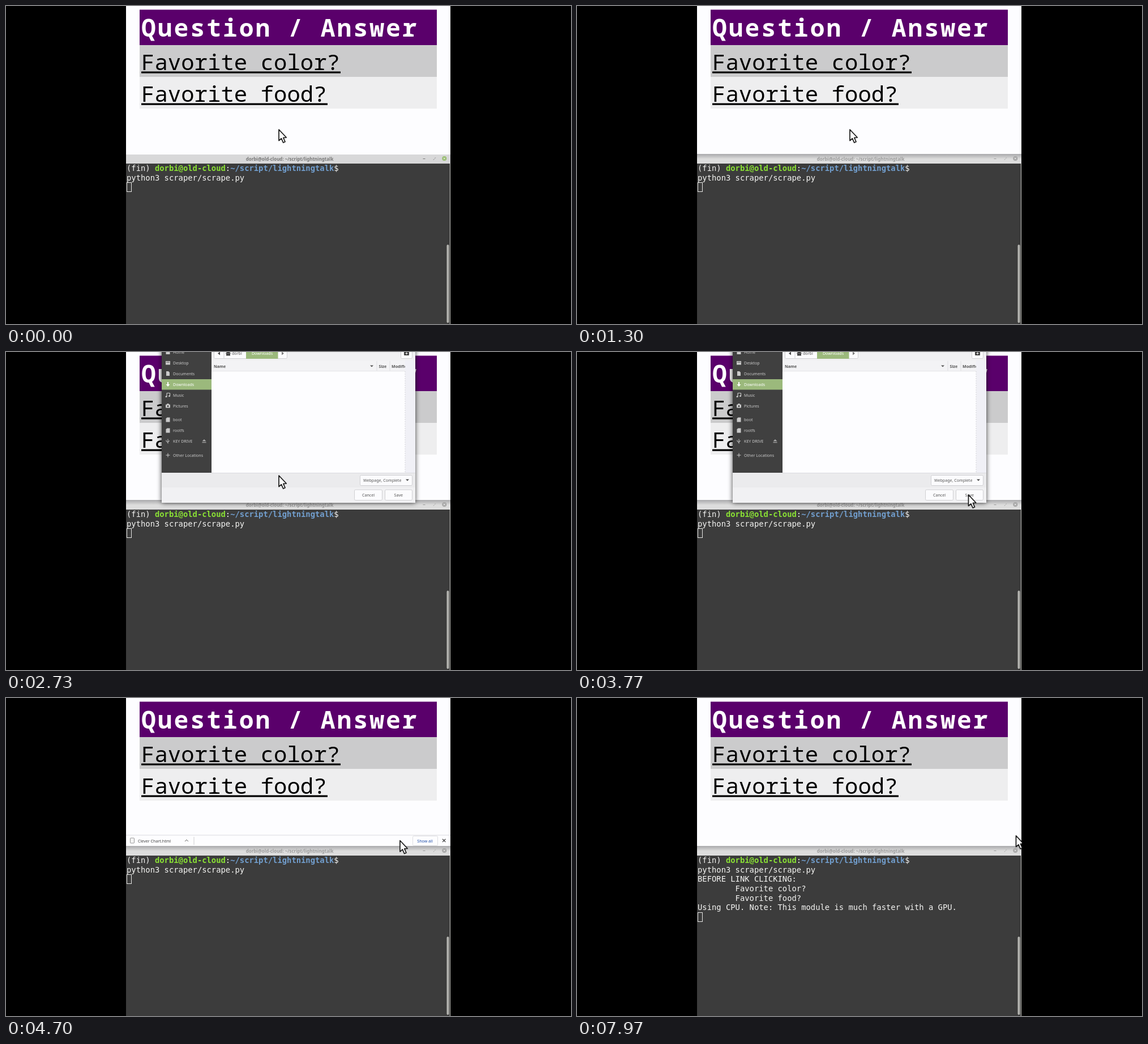
Animation of 998x561 px, one loop 8 s. Source, as an HTML page with a canvas:

```html
<!DOCTYPE html>
<html lang="en">
<head>
<meta charset="utf-8">
<title>Scraper demo</title>
<style>
html, body { margin: 0; width: 100%; height: 100%; overflow: hidden; background: #000; }
canvas { display: block; }
</style>
</head>
<body>
<canvas id="stage" width="998" height="561"></canvas>
<script>
const ctx = document.getElementById('stage').getContext('2d');
const LOOP = 8000;
const USER = 'dorbi', HOST = 'old-cloud', PAGE = 'Clever Chart', APP = 'Jovari Brulen';
const UI = '"Noto Sans", sans-serif';
const TERM = '"DejaVu Sans Mono", monospace';
const TABLE = '"Roboto Mono", "Noto Sans Mono", monospace';
const GREEN = '#9bb97c';

// Times in ms
const T = {
  switcher: 430, preview: 600, switchEnd: 960, focus: 1000,
  open: 1985, highlight: 2110, toSave: 2900, press: 4060, close: 4202,
  toBar: 4620, barClose: 5370, links: 5700, cpu: 6600
};

const clamp = v => Math.max(0, Math.min(1, v));
const span = (t, start, len) => clamp((t - start) / len);
const easeOut = p => 1 - (1 - p) * (1 - p);
const easeInOut = p => p * p * (3 - 2 * p);
const mix = (a, b, p) => a + (b - a) * p;

function rect(x, y, w, h, fill) {
  ctx.fillStyle = fill;
  ctx.fillRect(x, y, w, h);
}

function box(x, y, w, h, r, fill, stroke) {
  ctx.beginPath();
  ctx.roundRect(x, y, w, h, r);
  if (fill) { ctx.fillStyle = fill; ctx.fill(); }
  if (stroke) { ctx.strokeStyle = stroke; ctx.lineWidth = 1; ctx.stroke(); }
}

function text(str, x, y, font, color, align = 'left') {
  ctx.font = font;
  ctx.fillStyle = color;
  ctx.textAlign = align;
  ctx.fillText(str, x, y);
}

const label = (str, x, y, color, align) => text(str, x, y + 2.6, '7.1px ' + UI, color, align);
const boldLabel = (str, x, y, color) => text(str, x, y + 2.6, '600 7.1px ' + UI, color);

function poly(points, fill, stroke, width = 1) {
  ctx.beginPath();
  points.forEach(([x, y]) => ctx.lineTo(x, y));
  ctx.closePath();
  if (fill) { ctx.fillStyle = fill; ctx.fill(); }
  if (stroke) { ctx.strokeStyle = stroke; ctx.lineWidth = width; ctx.stroke(); }
}

function lines(color, width, ...segments) {
  ctx.beginPath();
  for (const [a, b, c, d] of segments) { ctx.moveTo(a, b); ctx.lineTo(c, d); }
  ctx.strokeStyle = color;
  ctx.lineWidth = width;
  ctx.stroke();
}

const down = (x, y, s, color) => poly([[x - s, y - s / 2], [x + s, y - s / 2], [x, y + s / 2]], color);
const side = (x, y, s, color) => poly([[x - s, y - 3], [x - s, y + 3], [x + s, y]], color);

function layer(alpha, draw) {
  if (alpha <= 0) return;
  ctx.save();
  ctx.globalAlpha = alpha;
  draw();
  ctx.restore();
}

function withShadow(blur, color, draw) {
  ctx.save();
  ctx.shadowBlur = blur;
  ctx.shadowColor = color;
  draw();
  ctx.restore();
}

function drawTable() {
  rect(236, 6.5, 525, 62.5, '#5a006b');
  rect(236, 69, 525, 56, '#cbcbcc');
  rect(236, 125, 525, 56, '#eeeeef');
  ctx.letterSpacing = '3px';
  text('Question / Answer', 239, 54, 'bold 43px ' + TABLE, '#fff');
  ctx.letterSpacing = '0px';
  text('Favorite color?', 239, 113, '39px ' + TABLE, '#000');
  text('Favorite food?', 239, 169, '39px ' + TABLE, '#000');
  rect(239, 115.5, 352, 3.2, '#000');
  rect(239, 171.5, 329, 3.2, '#000');
}

function drawDownloadBar(t) {
  const shut = easeOut(span(t, T.barClose, 130));
  if (t < T.close || shut === 1) return;
  ctx.save();
  ctx.translate(0, shut * 21);
  rect(212, 241.5, 573, 21, '#fdfdff');
  rect(212, 241.5, 573, 1, '#dcdce0');
  const w = 14 + 106 * easeOut(span(t, 4225, 200));
  ctx.save();
  ctx.beginPath();
  ctx.rect(212, 242, w, 20);
  ctx.clip();
  box(219.5, 247, 7, 9, 1, '#f4f4f4', '#999');
  label(PAGE + '.html', 233, 252, '#444');
  lines('#666', 1, [316, 253, 319, 250], [319, 250, 322, 253]);
  ctx.restore();
  lines('#d0d0d0', 1, [212 + w, 245, 212 + w, 259]);
  box(718.5, 243.5, 44, 17, 2, '#fdfdff', '#dedee2');
  label('Show all', 740, 252, '#1f4ea8', 'center');
  lines('#444', 1.3, [771, 248.7, 776.4, 254.1], [776.4, 248.7, 771, 254.1]);
  ctx.restore();
}

function drawTitleBar(active) {
  rect(212, 262, 573, 16, '#d8d8d9');
  if (!active) {
    const g = ctx.createLinearGradient(0, 261, 0, 270);
    g.addColorStop(0, '#a9a9ab');
    g.addColorStop(1, '#dddddd');
    rect(212, 261, 573, 17, g);
  }
  const ink = active ? '#777' : '#9b9b9b';
  text(`${USER}@${HOST}: ~/script/lightningtalk`, 501, 272.5, 'bold 7.95px ' + UI, ink, 'center');
  lines(ink, 1, [736.5, 269.5, 740.5, 269.5], [755, 271.5, 756.4, 270], [757.2, 269, 758.7, 267.5]);
  ctx.beginPath();
  ctx.arc(774.3, 269, 4, 0, 7);
  ctx.fillStyle = active ? '#98bd70' : '#a6a6a6';
  ctx.fill();
  lines('#f2f2f2', 1, [772.8, 267.5, 775.8, 270.5], [775.8, 267.5, 772.8, 270.5]);
}

function drawTerminal(t) {
  const step = 16.67, size = '13.84px ' + TERM, white = '#f4f4f2';
  rect(212, 278, 572, 283, '#3c3c3c');
  rect(784, 278, 1, 283, '#c9c9c4');
  box(778.5, 421, 4, 138, 2, '#b4b4b0');
  let x = 213;
  const prompt = [
    ['(fin) ', white, ''], [`${USER}@${HOST}`, '#8ae234', 'bold '], [':', white, ''],
    ['~/script/lightningtalk', '#729fcf', 'bold '], ['$', white, '']
  ];
  for (const [str, color, weight] of prompt) {
    text(str, x, 291, weight + size, color);
    x += ctx.measureText(str).width;
  }
  const rows = ['python3 scraper/scrape.py'];
  if (t >= T.links) rows.push('BEFORE LINK CLICKING:', '        Favorite color?', '        Favorite food?');
  if (t >= T.cpu) rows.push('Using CPU. Note: This module is much faster with a GPU.');
  rows.forEach((row, i) => text(row, 213, 291 + step * (i + 1), size, white));
  const top = Math.round(278.7 + step * (rows.length + 1));
  ctx.strokeStyle = '#e6e6e4';
  ctx.lineWidth = 1;
  ctx.strokeRect(213.5, top - 0.5, 8, 16);
}

function placeIcon(kind, x, y, c) {
  if (kind === 'home') {
    poly([[x - 5, y], [x, y - 4.5], [x + 5, y]], c);
    rect(x - 3.5, y, 7, 4, c);
  } else if (kind === 'desk') {
    rect(x - 4, y - 3, 8, 6.5, c);
    rect(x - 3, y - 1.5, 6, 1, '#555');
  } else if (kind === 'doc') {
    poly([[x - 3, y - 4], [x + 1, y - 4], [x + 3, y - 2], [x + 3, y + 4], [x - 3, y + 4]], c);
  } else if (kind === 'down') {
    rect(x - 1, y - 4, 2, 5, c);
    poly([[x - 3.5, y], [x + 3.5, y], [x, y + 4]], c);
  } else if (kind === 'music') {
    lines(c, 1.2, [x - 2, y + 3, x - 2, y - 3.5], [x - 2, y - 3.5, x + 3.5, y - 3.5], [x + 3.5, y - 3.5, x + 3.5, y + 2]);
    box(x - 4.5, y + 1.5, 3, 2.5, 1.2, c);
    box(x + 1, y + 0.5, 3, 2.5, 1.2, c);
  } else if (kind === 'photo') {
    box(x - 4, y - 2.5, 8, 6, 1, c);
    rect(x - 1.5, y - 4, 3, 2, c);
    box(x - 1.5, y - 1, 3, 3, 1.5, '#444');
  } else if (kind === 'disk') {
    poly([[x - 3.5, y - 2], [x - 1.5, y - 4], [x + 3.5, y - 4], [x + 3.5, y + 4], [x - 3.5, y + 4]], c);
  } else if (kind === 'stick') {
    lines(c, 1, [x, y - 4, x, y + 4], [x, y + 2, x - 3, y], [x, y + 1, x + 3, y - 1], [x - 3, y, x - 3, y - 2]);
  } else {
    lines(c, 1, [x - 3.5, y, x + 3.5, y], [x, y - 3.5, x, y + 3.5]);
  }
}

const PLACES = [
  ['Home', 'home', 0], ['Desktop', 'desk', 19], ['Documents', 'doc', 38], ['Downloads', 'down', 57],
  ['Music', 'music', 76], ['Pictures', 'photo', 95], ['boot', 'disk', 119.5], ['rootfs', 'disk', 138.5],
  ['KEY DRIVE', 'stick', 157.5], ['Other Locations', 'plus', 182]
];

function drawSidebar(marked) {
  rect(275, -82, 88, 295, '#404040');
  if (marked) rect(275, 48, 88, 18.5, GREEN);
  for (const [name, icon, y] of PLACES) {
    const color = marked && icon === 'down' ? '#fff' : '#c9c9c9';
    placeIcon(icon, 286, y, color);
    label(name, 295, y, color);
  }
  poly([[346.5, 157.5], [350, 154], [353.5, 157.5]], '#aaa');
  rect(346.5, 159, 7, 1.2, '#aaa');
}

function drawDialog(t) {
  const ink = '#555', edge = '#d0d0d3';
  const marked = t >= T.highlight;
  withShadow(9, 'rgba(0,0,0,.75)', () => box(275, -82, 448, 348, 2, marked ? '#ebebed' : '#f6f6f8'));
  drawSidebar(marked);

  rect(363, -82, 360, 97, '#f0f0f2');
  box(367.5, -9.5, 120 + 9, 21, 2, '#fbfbfd', edge);
  rect(424, -9, 56.5, 21, GREEN);
  lines(edge, 1, [385, -9, 385, 12]);
  side(376, 2.5, -2, '#444');
  placeIcon('home', 392.5, 2.5, '#444');
  label(USER, 399, 2.5, ink);
  label('Downloads', 452.5, 2.5, '#fff', 'center');
  side(489, 2.5, 2, '#777');
  box(697.5, -9.5, 20, 21, 2, '#fbfbfd', edge);
  box(703, -1, 9, 7, 1, '#444');
  lines('#fff', 1, [705.5, 2.5, 709.5, 2.5], [707.5, 0.5, 707.5, 4.5]);

  rect(363, 15, 342, 198, '#fdfdff');
  rect(363, 15, 342, 19, '#f3f3f5');
  rect(363, 33.5, 342, 0.7, '#dcdce0');
  boldLabel('Name', 367, 25, ink);
  down(646, 25, 3, ink);
  boldLabel('Size', 658.5, 25, ink);
  ctx.save();
  ctx.beginPath();
  ctx.rect(678, 15, 28, 19);
  ctx.clip();
  boldLabel('Modified', 681, 25, ink);
  ctx.restore();
  lines('#dedee2', 1, [655, 16, 655, 33], [678, 16, 678, 33]);
  rect(705, 15, 18, 198, '#f0f0f6');
  ctx.setLineDash([2, 2]);
  lines('#d5d5da', 1, [705, 34, 705, 213]);
  ctx.setLineDash([]);

  rect(363, 213, 360, 0.8, '#d8d8dc');
  rect(275, 239, 448, 27, marked ? '#f1f1f3' : '#fafafc');
  box(625.5, 217.5, 92, 18, 2, '#fbfbfd', edge);
  label('Webpage, Complete', 631, 226, ink);
  down(709, 226, 3, '#444');
  box(615.5, 243, 49, 18.5, 2, '#fbfbfd', edge);
  label('Cancel', 640, 252.3, ink, 'center');
  const pressed = t >= T.press;
  box(669.5, 243, 48, 18.5, 2, pressed ? '#87b158' : '#fbfbfd', pressed ? '#7ba04f' : edge);
  label('Save', 693.3, 252.3, pressed ? '#fff' : ink, 'center');
}

function showDialog(t) {
  if (t < T.open || t > T.close + 150) return;
  const closing = t >= T.close;
  const shown = closing ? 1 - easeOut(span(t, T.close, 150)) : easeOut(span(t, T.open, 100));
  const scale = 1 - (1 - shown) * (closing ? 0.096 : 0.055);
  layer(shown, () => {
    ctx.translate(499, 95);
    ctx.scale(scale, scale);
    ctx.translate(-499, -95);
    drawDialog(t);
  });
}

function drawPanel(x, y, w, h) {
  withShadow(8, '#000', () => box(x, y, w, h, 4, '#383838'));
  box(x + 0.5, y + 0.5, w - 1, h - 1, 4, null, '#555');
}

function drawSwitcher() {
  drawPanel(609, 205, 200, 103);
  box(704.5, 218.5, 77, 77, 3, '#565656', '#7c7c7c');
  const g = ctx.createLinearGradient(0, 225, 0, 277);
  g.addColorStop(0, '#343434');
  g.addColorStop(1, '#1d1d1d');
  withShadow(3, '#000', () => box(634, 225.5, 52, 52, 7, g));
  text('$', 639, 244, 'bold 14px ' + TERM, '#f2f2f2');
  rect(651, 244, 10, 2, '#f2f2f2');
  rect(717, 225.5, 52, 52, '#dd4b3e');
  label(`|${USER}@${HOST}: ...`, 660, 285, '#e8e8e8', 'center');
  label(`|${PAGE} - Jo...`, 742, 285, '#f2f2f2', 'center');
  down(742.5, 300.5, 3.5, '#8a8a8a');
}

function drawPreview() {
  drawPanel(645, 316.5, 180, 203);
  box(657.5, 329.5, 180, 177, 3, '#474747', '#686868');
  withShadow(4, '#000', () => rect(668, 367.5, 150, 86.5, '#111'));
  rect(669.5, 369, 150, 83.5, '#fdfdff');
  rect(669.5, 369, 150, 6, '#d9dbe0');
  rect(672, 370, 34, 5, '#fbfbfd');
  rect(675, 372, 14, 1, '#888');
  rect(704, 371.5, 1.5, 1.5, '#888');
  lines('#8a8a8a', 0.8, [672, 378, 674, 378], [676, 378, 678, 378], [680, 378, 682, 378]);
  rect(686, 376, 132, 4, '#eff0f3');
  rect(689, 377.6, 70, 0.8, '#aaa');
  ctx.save();
  ctx.translate(613.9, 385.4);
  ctx.scale(0.259, 0.259);
  drawTable();
  ctx.restore();
  label(`${PAGE} - ${APP}`, 694, 495.5, '#f0f0f0');
}

function drawPointer(t) {
  const a = easeInOut(span(t, T.toSave, 560));
  const b = easeInOut(span(t, T.toBar, 580));
  ctx.save();
  ctx.translate(mix(mix(482, 691.5, a), 775.5, b), mix(mix(218, 252, a), 243, b));
  ctx.lineJoin = 'round';
  const arrow = [[0, 0], [0, 19.5], [4.4, 15.6], [7.7, 23], [11, 21.5], [7.8, 14.4], [13.2, 14]];
  withShadow(2, 'rgba(0,0,0,.5)', () => poly(arrow, '#fff'));
  poly(arrow, '#fff', '#1c1c1c', 1.7);
  ctx.restore();
}

function render(t) {
  rect(0, 0, 998, 561, '#000');
  ctx.save();
  ctx.beginPath();
  ctx.rect(212, 0, 574, 561);
  ctx.clip();
  rect(212, 0, 573, 262, '#fdfdff');
  drawTable();
  drawDownloadBar(t);
  drawTitleBar(t < T.focus);
  drawTerminal(t);
  showDialog(t);
  const fade = 1 - span(t, T.switchEnd, 120);
  layer(span(t, T.switcher, 60) * fade, drawSwitcher);
  layer(span(t, T.preview, 90) * fade, drawPreview);
  drawPointer(t);
  ctx.restore();
}

const start = performance.now();
function tick() {
  render((performance.now() - start) % LOOP);
  requestAnimationFrame(tick);
}
tick();
</script>
</body>
</html>
```
